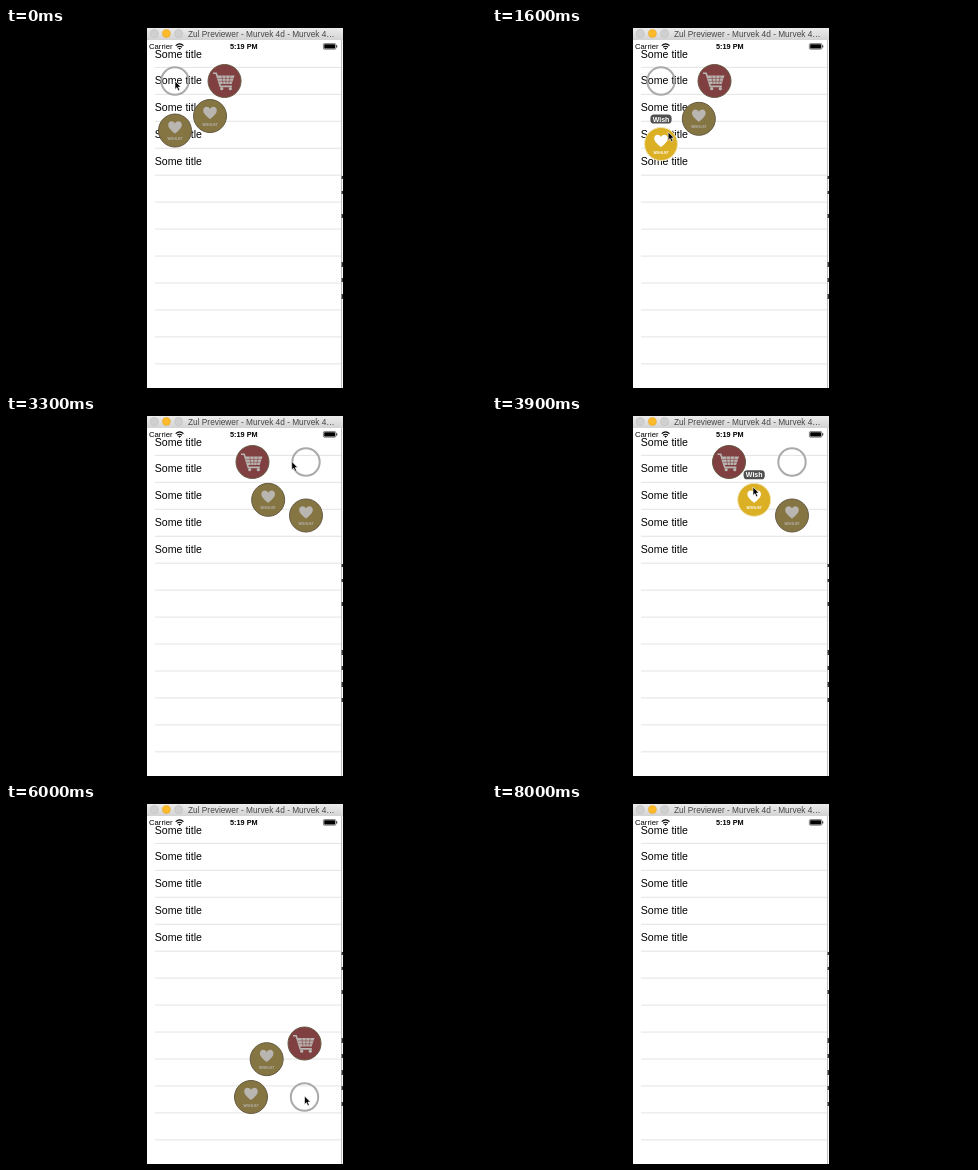
Animation, 480 px wide and 360 px high, one loop 8100 ms. Source, as an HTML page:

```html
<!DOCTYPE html>
<html lang="en">
<head>
<meta charset="utf-8">
<title>Radial context menu</title>
<style>
  html, body { margin: 0; width: 100%; height: 100%; overflow: hidden; background: #000; }
  svg { display: block; width: 100%; height: 100%; }
  text { font-family: "Liberation Sans", Arial, sans-serif; }
  .dim { --wish: #857543; --cart: #803f40; --ink: #b9b5b1; --rim: #665a43; }
  .lit { --wish: #dcb024; --cart: #d04343; --ink: #fff; --rim: #f3e5b0; }
</style>
</head>
<body>
<svg viewBox="0 0 480 360">
  <defs>
    <linearGradient id="bar" x2="0" y2="1">
      <stop stop-color="#ececec"/><stop offset="1" stop-color="#d3d3d3"/>
    </linearGradient>
    <g id="wish">
      <circle r="16.5" fill="var(--wish)" stroke="var(--rim)"/>
      <path d="M0 3.2C-2.2 .9-6.8-2-6.8-5.8C-6.8-10-1.6-10.6 0-7C1.6-10.6 6.8-10 6.8-5.8C6.8-2 2.2 .9 0 3.2Z" fill="var(--ink)"/>
      <text y="9.6" font-size="3.2" font-weight="bold" text-anchor="middle" fill="var(--ink)">WISHLIST</text>
    </g>
    <g id="cart">
      <circle r="16.5" fill="var(--cart)" stroke="var(--rim)"/>
      <path d="M-11.5-7.7H-8.3L-4.2 5.4H7.4" fill="none" stroke="var(--ink)" stroke-width="1.6"/>
      <path d="M-7.6-5.4H10L7.2 3H-5Z" fill="var(--ink)"/>
      <path d="M-7-2.6H9.4M-6 .3H8.2M-2.6-5.4L-1.5 3M1.4-5.4V3M5.6-5.4L4.3 3" stroke="var(--cart)" stroke-width=".55"/>
      <circle cx="-2.8" cy="7.7" r="1.6" fill="var(--ink)"/>
      <circle cx="5.8" cy="7.7" r="1.6" fill="var(--ink)"/>
    </g>
  </defs>

  <rect x="141" width="196" height="360" fill="#fff"/>
  <rect id="press" x="141" y="39" width="195" height="27" fill="#d9d9d9"/>
  <g id="rows"></g>
  <path d="M335.6 12V360" stroke="#a5a5a5" stroke-width=".8"/>
  <g id="log"></g>

  <rect x="141" width="196" height="12" fill="url(#bar)"/>
  <g stroke-width=".5">
    <circle cx="148.2" cy="5.6" r="4" fill="#d0d0d0" stroke="#b9b9b9"/>
    <circle cx="160.4" cy="5.6" r="4" fill="#fdbb2c" stroke="#dea123"/>
    <circle cx="172.6" cy="5.6" r="4" fill="#d0d0d0" stroke="#b9b9b9"/>
  </g>
  <text x="182" y="8.7" font-size="8.3" fill="#454545">Zul Previewer - Murvek 4d - Murvek 4…</text>

  <text x="143" y="21.2" font-size="7.7">Carrier</text>
  <g fill="none" stroke="#000" stroke-width="1.2">
    <path d="M169.7 17.6Q173.6 14.2 177.5 17.6M171.2 19.3Q173.6 17.2 176 19.3"/>
  </g>
  <path d="M172.2 20.2Q173.6 19.2 175 20.2L173.6 21.7Z"/>
  <text x="224" y="21.2" font-size="7.3" font-weight="bold">5:19 PM</text>
  <rect x="317.4" y="15.6" width="12.4" height="5.6" rx="1" fill="none" stroke="#000" stroke-width=".5"/>
  <rect x="318.2" y="16.3" width="10.8" height="4.2" rx=".4"/>
  <rect x="330.3" y="17.3" width=".9" height="2.2"/>

  <g id="menu">
    <circle id="ring" r="13.7" fill="none" stroke="#aaa" stroke-width="2"/>
    <use href="#cart"/><use href="#wish"/><use href="#wish"/>
    <g id="tip">
      <rect x="-10.6" y="-4.5" width="21.2" height="9" rx="3.6" fill="#505050"/>
      <text y="2.5" font-size="7" font-weight="bold" text-anchor="middle" fill="#fff"></text>
    </g>
  </g>
  <path id="cursor" d="M0 0V8.4L1.9 6.6L3.3 9.8L4.8 9.1L3.4 6H6Z" stroke="#fff" stroke-width=".6"/>
</svg>
<script>
const LOOP = 8100, STEP = 100, REACH = 53.5, PULL = 9.5;
const $ = id => document.getElementById(id);

// hover: [start, item]; each lasts until the next one or until closing
const menus = [
  { x: 169, y: 53, open: -145, close: 1900, dir: [0, 45, 90],
    hover: [[300, 2], [600, 1], [800, 0], [1200, 1], [1400, 2]] },
  { x: 300, y: 46, open: 2850, close: 4380, dir: [180, 135, 90],
    hover: [[3400, 0], [3900, 1], [4200, 2]] },
  { x: 298.5, y: 293, open: 5630, close: 6950, dir: [-90, -135, 180],
    hover: [[6200, 0], [6600, 1], [6800, 2]] }
];

// time, x, y of the pointer tip
const path = [
  [0, 169, 53], [200, 169, 60], [400, 170, 110], [500, 172, 110], [700, 202, 88],
  [900, 222, 53], [1100, 221, 56], [1300, 201, 88], [1500, 176, 104], [1900, 177, 104],
  [2500, 300, 45], [3200, 300, 45], [3500, 245, 47], [3700, 242, 49], [3900, 261, 71],
  [4300, 297, 104], [4600, 297.5, 104], [5000, 298.5, 292], [6000, 298.5, 292],
  [6300, 299, 244], [6500, 297, 243], [6700, 265, 263], [6900, 255, 285],
  [7300, 255, 285], [7700, 326, 6]
];

// time shown from, y, height
const marks = [[0, 148, 3], [0, 163, 3], [0, 186, 4], [0, 234, 5], [0, 250, 4],
               [0, 266, 5], [2000, 282, 4], [4400, 298, 4]];

const clamp = u => Math.max(0, Math.min(1, u));
const smooth = u => { u = clamp(u); return u * u * (3 - 2 * u); };
const easeOut = u => 1 - (1 - clamp(u)) ** 3;
const place = (el, x, y, k = 1) =>
  el.setAttribute("transform", `translate(${x.toFixed(2)} ${y.toFixed(2)}) scale(${k.toFixed(3)})`);
const show = (el, on) => el.setAttribute("visibility", on ? "inherit" : "hidden");

let rows = "";
for (let i = 0; i < 12; i++) {
  const y = 39.4 + i * 26.95;
  rows += `<path d="M149 ${y}H335" stroke="#dcdcdc" stroke-width=".8"/>`;
  if (i < 5) rows += `<text x="148.8" y="${y - 9.9}" font-size="10.6">Some title</text>`;
}
$("rows").innerHTML = rows;
$("log").innerHTML = marks.map(([, y, h]) =>
  `<rect x="335.6" y="${y}" width="1.3" height="${h}" fill="#222"/>`).join("");

const items = [...document.querySelectorAll("#menu use")];
const logs = [...$("log").children];
const tipText = document.querySelector("#tip text");

function pointer(t) {
  const i = Math.max(1, path.findIndex(p => p[0] >= t));
  const [a, b] = [path[i - 1], path[i]];
  const u = smooth((t - a[0]) / (b[0] - a[0]));
  return [a[1] + (b[1] - a[1]) * u, a[2] + (b[2] - a[2]) * u];
}

function drawMenu(m, t) {
  const spread = easeOut((t - m.open) / 250) * (1 - smooth((t - m.close) / 200));
  place($("ring"), m.x, m.y);
  show($("ring"), t < m.close + 100);
  show($("tip"), false);
  items.forEach((el, i) => {
    let pull = 0, lit = false;
    m.hover.forEach(([from, item], n) => {
      if (item !== i) return;
      const to = n + 1 < m.hover.length ? m.hover[n + 1][0] : m.close;
      pull += smooth((t - from) / 150) - smooth((t - to) / 150);
      lit = lit || (t >= from && t < to);
    });
    const a = m.dir[i] * Math.PI / 180, d = spread * (REACH + PULL * pull);
    const x = m.x + d * Math.cos(a), y = m.y + d * Math.sin(a);
    place(el, x, y, Math.min(1, spread * 1.1));
    el.setAttribute("class", lit ? "lit" : "dim");
    if (lit) {
      show($("tip"), true);
      place($("tip"), x, y - 25);
      tipText.textContent = i ? "Wish" : "Cart";
    }
  });
}

function draw(t) {
  const m = menus.find(m => t >= m.open && t < m.close + 200);
  $("menu").setAttribute("visibility", m ? "visible" : "hidden");
  if (m) drawMenu(m, t);
  show($("press"), t >= 2700 && t < 2900);
  logs.forEach((el, i) => show(el, t >= marks[i][0]));
  show($("cursor"), t < 7700);
  if (t < 7700) place($("cursor"), ...pointer(t));
}

const start = performance.now();
function tick() {
  const t = (performance.now() - start) % LOOP;
  draw(Math.floor(t / STEP) * STEP);
  requestAnimationFrame(tick);
}
tick();
</script>
</body>
</html>
```
